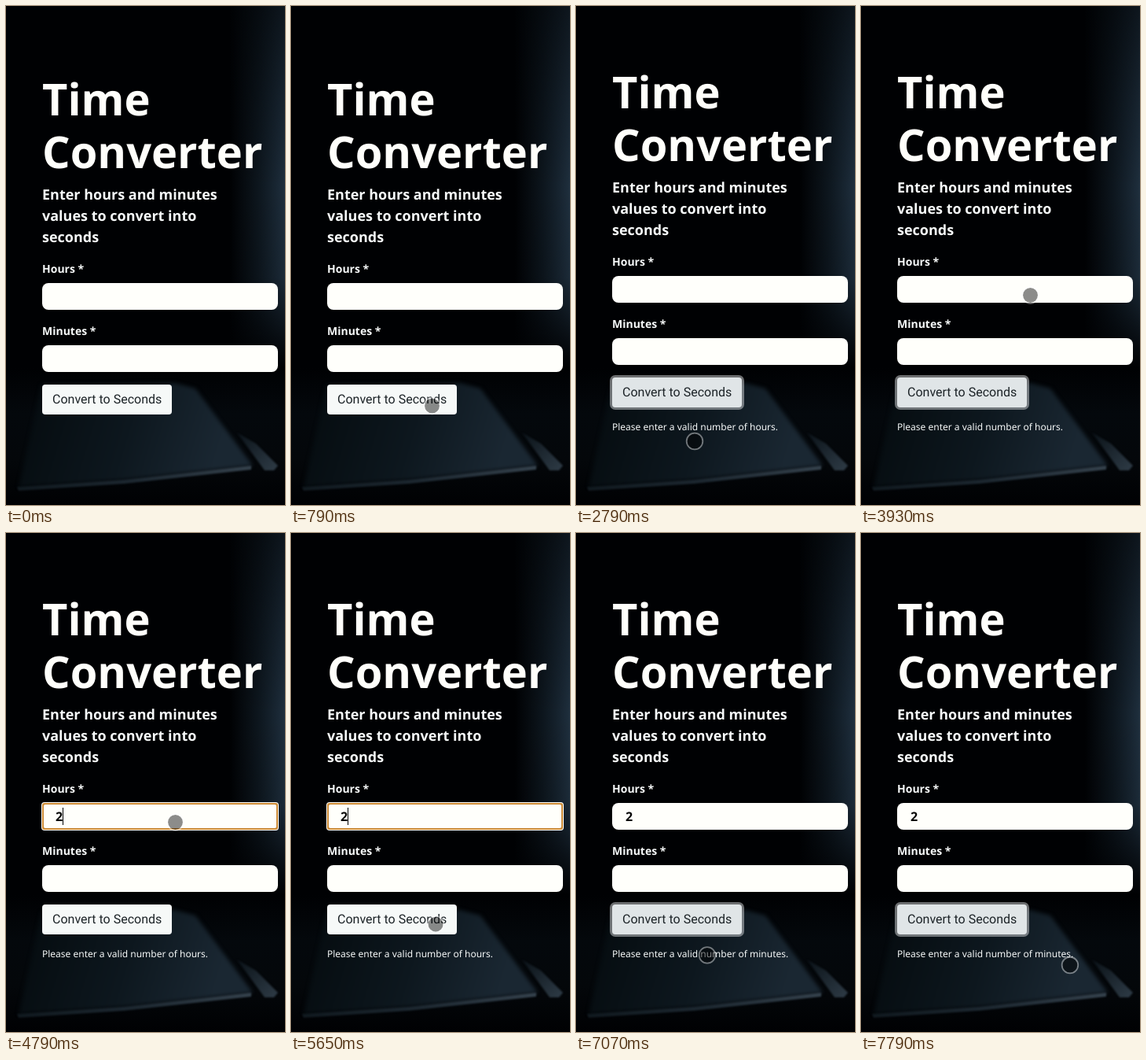
Animation of 355x634 px, one loop 8000 ms. Source, as an HTML page with a canvas:

```html
<!DOCTYPE html>
<html lang="en">
<head>
<meta charset="utf-8">
<title>Time Converter</title>
<style>
  html, body { margin: 0; width: 100%; height: 100%; overflow: hidden; background: #000; }
  canvas { display: block; }
</style>
</head>
<body>
<canvas id="stage" width="355" height="634"></canvas>
<script>
const W = 355, H = 634, LOOP = 8000, TICK = 1000 / 7;
const APPEAR = 500, SUBMIT = 1780, FOCUS = 4210, TYPE = 4780, RESUBMIT = 6640;
const ctx = document.getElementById('stage').getContext('2d');
const SANS = '"Noto Sans", "Open Sans", sans-serif';
const ROBOTO = 'Roboto, Arial, sans-serif';
const PAPER = '#fffffb';

const clamp = v => Math.min(1, Math.max(0, v));
const lerp = (a, b, k) => a + (b - a) * k;
const ramp = (t, start, length) => clamp((t - start) / length);
const easeOut = k => 1 - (1 - k) ** 1.8;
const linear = k => k;

// Pointer stops, and the sweeps between them with their curve handles
const ENTRY = [301, 469], PRESS = [179.5, 508], DIP = [151, 553], INPUT = [215.5, 367.5];
const BELOW = [179, 518], AGAIN = [182.5, 498], EXIT = [266, 549];
const sweeps = [
  { start: APPEAR, length: 286, ease: easeOut, path: [ENTRY, PRESS] },
  { start: 2357, length: 429, ease: linear, path: [PRESS, DIP] },
  { start: 2786, length: 1143, ease: easeOut, path: [DIP, [175, 595], [305, 470], INPUT] },
  { start: 5357, length: 429, ease: easeOut, path: [INPUT, BELOW] },
  { start: 6071, length: 143, ease: linear, path: [BELOW, AGAIN] },
  { start: 6929, length: 857, ease: linear, path: [AGAIN, [135, 590], [190, 588], EXIT] }
];

function bezier(points, k) {
  if (points.length === 1) return points[0];
  const next = points.slice(1).map((p, i) => [lerp(points[i][0], p[0], k), lerp(points[i][1], p[1], k)]);
  return bezier(next, k);
}

function pointerAt(t) {
  const { start, length, ease, path } = sweeps.filter(s => s.start <= t + 1).pop();
  return bezier(path, ease(ramp(t, start, length)));
}

function makeBackdrop() {
  const layer = document.createElement('canvas');
  layer.width = W;
  layer.height = H;
  const g = layer.getContext('2d');

  const gradient = (x0, y0, x1, y1, ...colors) => {
    const grad = g.createLinearGradient(x0, y0, x1, y1);
    colors.forEach((color, i) => grad.addColorStop(i / (colors.length - 1), color));
    return grad;
  };
  const polygon = (fill, blur, ...points) => {
    g.filter = `blur(${blur}px)`;
    g.fillStyle = fill;
    g.beginPath();
    points.forEach(([x, y]) => g.lineTo(x, y));
    g.fill();
    g.filter = 'none';
  };

  g.fillStyle = '#000103';
  g.fillRect(0, 0, W, H);

  // Wall, lit towards the right and brightest halfway down
  g.fillStyle = gradient(285, 0, W, 0, 'rgba(28,46,60,0)', 'rgba(28,46,60,.45)', 'rgba(34,52,68,.9)');
  g.fillRect(285, 0, W - 285, 460);
  g.fillStyle = gradient(0, 0, 0, 460,
    'rgba(0,2,4,.55)', 'rgba(0,2,4,.25)', 'rgba(0,2,4,0)', 'rgba(0,2,4,.1)', '#000103');
  g.fillRect(285, 0, W - 285, 460);

  // Desk and book
  g.fillStyle = gradient(0, 460, 0, H, '#000103', '#04080c', '#04070a', '#000103');
  g.fillRect(0, 460, W, H - 460);
  polygon(gradient(40, 500, 270, 570, '#060d11', '#0d171e', '#1a2732'), 2.5,
    [45, 481], [215, 479], [241, 486], [314, 584], [150, 602], [16, 611]);
  polygon(gradient(14, 0, 314, 0, '#10191f', '#1d2831', '#35424d'), 0.8,
    [14, 611], [150, 602], [312, 584], [312, 589], [150, 607], [16, 616]);
  polygon(gradient(296, 544, 345, 590, '#0c141a', '#2e3b46'), 0.8,
    [294, 542], [318, 556], [346, 584], [341, 590], [329, 590]);
  return layer;
}

const backdrop = makeBackdrop();

function text(str, x, y, size, weight = 700, color = '#f6f9f9', family = SANS) {
  ctx.textRendering = 'geometricPrecision';
  ctx.font = `${weight} ${size}px ${family}`;
  ctx.fillStyle = color;
  ctx.fillText(str, x, y);
}

function box(x, y, w, h, r, fill) {
  ctx.fillStyle = fill;
  ctx.beginPath();
  ctx.roundRect(x, y, w, h, r);
  ctx.fill();
}

function field(y, focused) {
  const layer = (inset, r, fill) =>
    box(46 + inset, y + inset, 300 - 2 * inset, 34 - 2 * inset, r, fill);
  if (focused) {
    layer(-1, 4, PAPER);
    layer(0, 3, '#cc8a35');
    layer(2, 2, PAPER);
  } else {
    layer(0, 8, PAPER);
  }
}

function button(y, focus) {
  const spread = 3 * focus;
  if (focus > 0) {
    box(46 - spread, y - spread, 165 + 2 * spread, 38 + 2 * spread, 4 + spread,
      'rgba(216,217,219,.5)');
  }
  box(46, y, 165, 38, 4, focus > 0 ? '#e0e5e7' : '#f6f9f8');
  text('Convert to Seconds', 59, y + 24, 16, 400, '#1c2327', ROBOTO);
}

function pointer([x, y]) {
  const circle = r => {
    ctx.beginPath();
    ctx.arc(x, y, r, 0, Math.PI * 2);
  };
  circle(9.5);
  ctx.fillStyle = 'rgba(0,0,0,.45)';
  ctx.fill();
  circle(10.3);
  ctx.strokeStyle = 'rgba(255,255,255,.42)';
  ctx.lineWidth = 1.8;
  ctx.stroke();
}

function draw(t) {
  const submitted = t >= SUBMIT;
  const typed = t >= TYPE;
  const editing = t >= FOCUS && t < RESUBMIT;
  const blinkStart = typed ? TYPE : FOCUS;
  const caret = editing && t < 6490 && Math.floor((t - blinkStart) / 430) % 4 !== 1;
  const glow = ramp(t, 1643, 286) - ramp(t, 4071, 286) + ramp(t, 6500, 286);

  ctx.drawImage(backdrop, 0, 0);
  ctx.save();
  ctx.translate(0, submitted ? -9 : 0);
  ['Time', 'Converter'].forEach((line, i) => text(line, 46, 139 + 67 * i, 56, 700, PAPER));
  ['Enter hours and minutes', 'values to convert into', 'seconds']
    .forEach((line, i) => text(line, 46, 246 + 27 * i, 18));
  ['Hours *', 'Minutes *'].forEach((label, i) => {
    text(label, 46, 339 + 79 * i, 14);
    field(352 + 79 * i, editing && i === 0);
  });
  if (typed) text('2', 63, 375, 16, 700, '#050505');
  if (caret) box(typed ? 72 : 63, 358, 1, 22, 0, '#000');
  button(481, glow);
  ctx.restore();

  if (submitted) {
    const unit = t >= RESUBMIT ? 'minutes' : 'hours';
    text(`Please enter a valid number of ${unit}.`, 46, 539, 12, 400);
  }
  if (t >= APPEAR) pointer(pointerAt(t));
}

// The picture advances seven times a second
function frame() {
  const t = performance.now() % LOOP;
  draw(APPEAR + Math.floor((t + 5 - APPEAR) / TICK) * TICK);
  requestAnimationFrame(frame);
}
frame();
</script>
</body>
</html>
```
